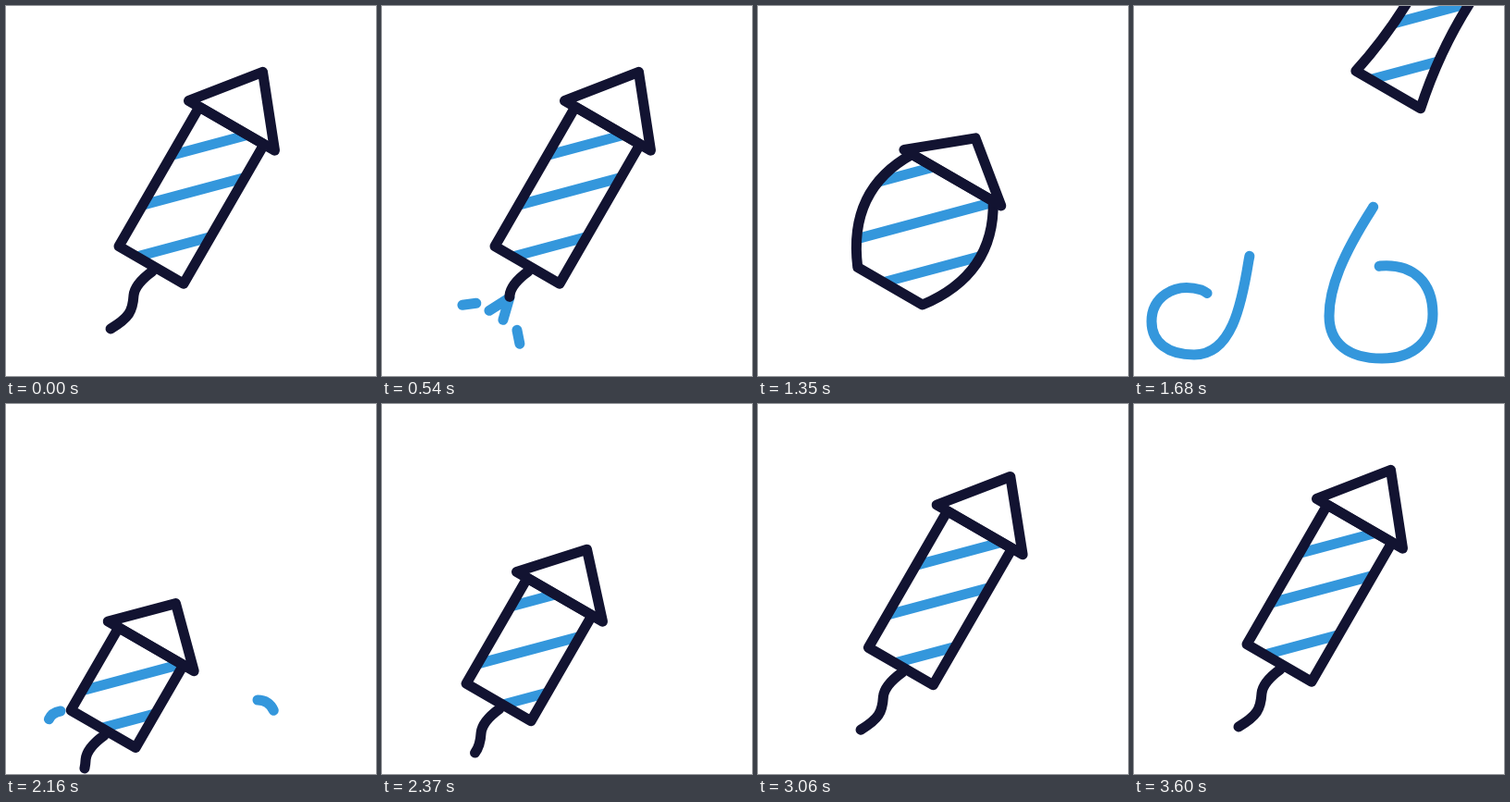
Write an HTML page that moves like this. It is 400 px wide and 400 px high and loops after 3.63 s.

```html
<!DOCTYPE html>
<html lang="en">
<head>
<meta charset="utf-8">
<title>Firework rocket</title>
<style>
  html, body { margin: 0; width: 100%; height: 100%; overflow: hidden; background: #fff; }
  svg { display: block; width: 100%; height: 100%; }
  path { fill: none; stroke-width: 11; stroke-linecap: round; stroke-linejoin: round; }
  .dark { stroke: #121331; }
  .blue { stroke: #3497dc; }
</style>
</head>
<body>
<svg viewBox="0 0 400 400">
  <clipPath id="bodyClip"><path id="bodyArea"/></clipPath>
  <path class="blue trail" pathLength="1" d="M130 235C128 250 127 260 124 275C116 325 105 377 65 377C37 377 19 364 19 341C19 316 42 298 73 307C100 318 88 362 64 360C50 359 42 350 46 342C48 336 53 333 59 332"/>
  <path class="blue trail" pathLength="1" d="M284 175L257 220C225 270 211 305 211 335C211 365 232 381 268 381C304 381 323 360 323 333C323 300 303 278 266 281C235 290 230 345 262 350C285 352 296 345 290 333C287 325 281 320 272 320"/>
  <g id="base">
    <path id="sparks" class="blue"/>
    <path id="fuse" class="dark" pathLength="1" d="M1 7C-10 15 -18 23 -19 33C-20 50 -24 57 -44 69"/>
    <g transform="rotate(-60)">
      <path id="stripes" class="blue" clip-path="url(#bodyClip)"/>
      <path id="body" class="dark"/>
      <path id="cap" class="dark"/>
    </g>
  </g>
</svg>
<script>
const LOOP = 3630;
const RETURN = 1800; // after this the rocket comes back from below
const HALF = 40.4;   // half width of the rocket's foot
const $ = id => document.getElementById(id);
const trails = document.querySelectorAll('.trail');
const fuseLength = $('fuse').getTotalLength();

const ramp = (t, from, to) => Math.min(1, Math.max(0, (t - from) / (to - from)));
const smooth = (t, from, to) => {
  const p = ramp(t, from, to);
  return p * p * (3 - 2 * p);
};

function trim(path, from, to) {
  path.style.display = to - from > .001 ? '' : 'none';
  path.setAttribute('stroke-dasharray', `${to - from} 2`);
  path.setAttribute('stroke-dashoffset', -from);
}

function drawRocket(t) {
  // crouch: 1 is squashed, below 0 is stretched; flight and arrival move the whole rocket
  const away = t < RETURN;
  const crouch = away ? 1.14 * smooth(t, 600, 1060) - 1.59 * smooth(t, 1400, 1640) : 0;
  const flight = away ? (Math.max(0, t - 1580) / 100) ** 2 : 0;
  const arrival = away ? 0
    : .95 * (1 - ramp(t, 2160, 3600) + ramp(t, 2160, 720)) ** 3 + .05 * Math.exp((2160 - t) / 80);
  const squeeze = Math.min(1, arrival);
  const slide = away ? 0 : 1 - smooth(t, 2620, 3400);

  const x = -12.5 * crouch + 110 * flight - 52 * arrival;
  const y = 20 * crouch - 177 * flight + 71.5 * arrival;
  const height = 174 - 34 * crouch - 71 * squeeze;
  const tip = height + 67 - 15.4 * crouch - 13.5 * squeeze;
  const brim = 53.7 + 6 * crouch;
  const top = HALF + 9 * crouch;
  const side = HALF + 45 * crouch;
  const stripes = [
    154 + 4 * crouch + 28 * squeeze ** 2,
    92 - 8 * crouch,
    18 - 8.6 * crouch + 11 * squeeze ** 2
  ];

  $('base').setAttribute('transform', `translate(${157 + x} ${280 + y})`);
  const outline = `M0 ${-HALF}L0 ${HALF}Q${height / 2} ${side} ${height} ${top}`
    + `L${height} ${-top}Q${height / 2} ${-side} 0 ${-HALF}Z`;
  $('body').setAttribute('d', outline);
  $('bodyArea').setAttribute('d', outline);
  $('cap').setAttribute('d', `M${height} ${-brim}L${tip} 0L${height} ${brim}Z`);
  $('stripes').setAttribute('d', stripes.map(u => `M${u - 27 * slide - 99} -99l198 198`).join(''));
}

function drawSparks(t, fuseLeft) {
  const size = (.55 + t / 1200) * ramp(t, 60, 250) * (1 - ramp(t, 1100, 1290));
  const tip = $('fuse').getPointAtLength(fuseLeft * fuseLength);
  const line = (x1, y1, x2, y2) => `M${tip.x + x1} ${tip.y + y1}L${tip.x + x2} ${tip.y + y2}`;
  let d = '';
  if (size > .02) {
    d += line(0, 1, -22 * size, 15 * size) + line(0, 1, -7 * size, 25 * size);
  }
  // Loose dashes grow outwards, then vanish from the inside
  if (t > 90 && t < 1290) {
    const phase = (t - 90) % 300 / 150;
    const head = ramp(phase, 0, 1), tail = ramp(phase, 1, 2);
    d += line(-36 - 15 * tail, 7 + 2 * tail, -36 - 15 * head, 7 + 2 * head)
      + line(8 + 3 * tail, 36 + 15 * tail, 8 + 3 * head, 36 + 15 * head);
  }
  $('sparks').setAttribute('d', d);
}

function frame() {
  const t = performance.now() % LOOP;
  const fuseLeft = t < RETURN
    ? (1 - ramp(t, 0, 1130)) ** 1.27
    : 1 - (1.04 * (1 - ramp(t, RETURN, 3200)) * 1400 / 1594) ** 2;
  drawRocket(t);
  drawSparks(t, fuseLeft);
  trim($('fuse'), 0, fuseLeft);
  const head = 1 - (1 - ramp(t, 1530, 1840)) ** 2;
  const tail = smooth(t, 1560, 2240);
  for (const trail of trails) trim(trail, tail, head);
  requestAnimationFrame(frame);
}
frame();
</script>
</body>
</html>
```
